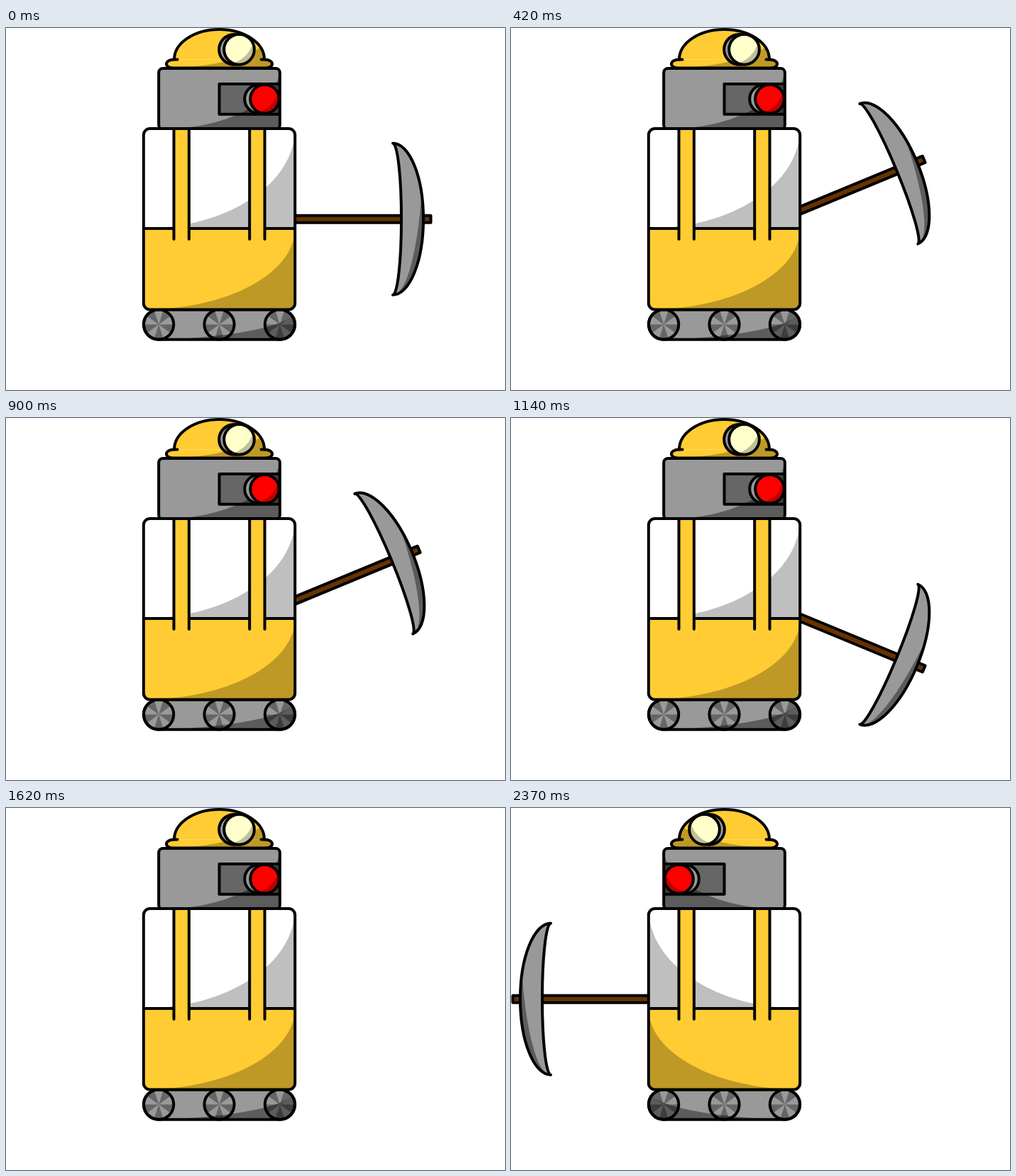
Recreate the animation shown at these times as an HTML page with a canvas. Size 703 by 511 pixels, loop 2.4 s.

```html
<!DOCTYPE html>
<html lang="en">
<head>
<meta charset="utf-8">
<title>Mining robot</title>
<style>
  html, body { margin: 0; width: 100%; height: 100%; overflow: hidden; background: #fff; }
  canvas { display: block; }
</style>
</head>
<body>
<canvas id="stage" width="703" height="511"></canvas>
<script>
const ctx = document.getElementById('stage').getContext('2d');
const LOOP = 2400, TICK = 30;
const U = 64 / 3;                 // design grid unit
const CENTER = 300.5;             // everything is drawn relative to this axis
const HALF = 5 * U, WIDTH = 10 * U;
const BODY_TOP = 142, BELT = 283, BODY_BOTTOM = 397.5;
const YELLOW = '#ffcc33', GRAY = '#999', DARK = '#666';

const clamp = (v, lo, hi) => Math.min(hi, Math.max(lo, v));

function roundBox(x, y, w, h, rx, ry = rx) {
  const p = new Path2D();
  p.roundRect(x, y, w, h, { x: rx, y: ry });
  return p;
}

function oval(x, y, rx, ry = rx) {
  const p = new Path2D();
  p.ellipse(x, y, rx, ry, 0, 0, 7);
  return p;
}

function line(x1, y1, x2, y2) {
  ctx.beginPath();
  ctx.moveTo(x1, y1);
  ctx.lineTo(x2, y2);
  ctx.stroke();
}

function clipped(path, draw) {
  ctx.save();
  ctx.clip(path);
  draw();
  ctx.restore();
}

// Darkens the lower corner of a box outside a quarter ellipse.
function shade(x, y, w, h, dir, alpha) {
  ctx.beginPath();
  if (dir > 0) ctx.ellipse(x, y, w, h, 0, 0, Math.PI / 2);
  else ctx.ellipse(x + w, y, w, h, 0, Math.PI, Math.PI / 2, true);
  ctx.lineTo(dir > 0 ? x + w : x, y + h);
  ctx.closePath();
  ctx.fillStyle = `rgba(0,0,0,${alpha})`;
  ctx.fill();
}

function shape(path, fill, box, dir, alpha) {
  ctx.fillStyle = fill;
  ctx.fill(path);
  if (box) clipped(path, () => shade(...box, dir, alpha));
  ctx.stroke(path);
}

// turn: 0 = facing right, 1 = facing the viewer, 2 = facing left
function faces(turn, drawSide, drawFront) {
  const front = WIDTH * (1 - Math.abs(1 - turn)), side = WIDTH - front;
  const sideX = turn < 1 ? -HALF : HALF - side;
  const frontX = turn < 1 ? HALF - front : -HALF;
  if (front > 0.5) drawFront(frontX, front);
  if (side > 0.5) drawSide(sideX, side);
}

function pickaxe(angle, pull, dir) {
  const pivotX = 77.5, y = 269.7;
  ctx.save();
  ctx.scale(dir, 1);
  ctx.translate(pivotX - pull, y);
  ctx.rotate(angle * Math.PI / 180);
  ctx.translate(-pivotX, 0);
  shape(roundBox(pivotX, -5, 298 - pivotX, 10, 0.5), '#663300');
  const head = new Path2D(), tip = 244.5, reach = 107;
  head.ellipse(tip, 0, 43, reach, 0, -Math.PI / 2, Math.PI / 2);
  head.ellipse(tip, 0, 12, reach, 0, Math.PI / 2, -Math.PI / 2, true);
  head.closePath();
  shape(head, GRAY, [tip, -reach, 43, 2 * reach], 1, 0.4);
  ctx.restore();
}

function wheel(x, y, rx, ry) {
  ctx.fillStyle = DARK;
  ctx.fill(oval(x, y, rx, ry));
  ctx.fillStyle = GRAY;
  const step = Math.PI / 5;
  for (let i = 0; i < 5; i++) {
    const mid = -Math.PI / 2 + i * 2 * step;
    ctx.beginPath();
    ctx.moveTo(x, y);
    ctx.ellipse(x, y, rx, ry, 0, mid - step / 2, mid + step / 2);
    ctx.fill();
  }
  ctx.stroke(oval(x, y, rx, ry));
}

function tracks(turn, dir) {
  const top = BODY_BOTTOM, h = 2 * U - 0.5, r = h / 2;
  const side = (x, w) => {
    const s = w / WIDTH, belt = roundBox(x, top, w, h, r * s, r);
    ctx.fillStyle = GRAY;
    ctx.fill(belt);
    for (const pos of [1, 5, 9]) wheel(x + pos * U * s, top + r, r * s, r);
    clipped(belt, () => shade(x, top, w, h, dir, 0.4));
    ctx.stroke(belt);
  };
  const front = (x, w) => {
    const s = w / WIDTH, fw = 4 * U * s;
    for (const pos of [0.5, 5.5]) {
      const fx = x + pos * U * s;
      shape(roundBox(fx, top, fw, h, 5 * s, 5), DARK, [fx, top, fw, h], dir, 0.6);
    }
  };
  faces(turn, side, front);
}

function bodyFace(x, w, dir, detail) {
  const s = w / WIDTH;
  const face = roundBox(x, BODY_TOP, w, BODY_BOTTOM - BODY_TOP, 9 * s, 9);
  ctx.fillStyle = '#fff';
  ctx.fill(face);
  clipped(face, () => {
    ctx.fillStyle = YELLOW;
    ctx.fillRect(x, BELT, w, BODY_BOTTOM - BELT);
    shade(x, BODY_TOP, w, BELT - BODY_TOP, dir, 0.25);
    shade(x, BELT, w, BODY_BOTTOM - BELT, dir, 0.25);
  });
  line(x, BELT, x + w, BELT);
  detail(x, s);
  ctx.stroke(face);
}

function straps(x, s) {
  const end = 298;
  for (const pos of [2, 7]) {
    const left = x + pos * U * s, w = U * s;
    ctx.fillStyle = YELLOW;
    ctx.fillRect(left, BODY_TOP, w, end - BODY_TOP);
    line(left, BODY_TOP, left, end);
    line(left + w, BODY_TOP, left + w, end);
  }
}

function hatch(x, s) {
  const left = x + 2.5 * U * s, w = 5 * U * s;
  ctx.strokeRect(left, 163.3, w, 213);
  line(left, 269.7, left + w, 269.7);
}

function body(turn, dir) {
  faces(turn,
    (x, w) => bodyFace(x, w, dir, straps),
    (x, w) => bodyFace(x, w, dir, hatch));
}

function lens(x, y, r, rimShift, color, dir) {
  shape(oval(x + rimShift, y, r), GRAY);
  shape(oval(x, y, r), color, [x - r, y - r, 2 * r, 2 * r], dir, 0.25);
}

function head(turn, dir) {
  const top = 57, h = 86, half = 4 * U, eyeY = 100.3;
  const box = roundBox(-half, top, 2 * half, h, 6);
  ctx.fillStyle = GRAY;
  ctx.fill(box);
  clipped(box, () => {
    const left = turn < 1 ? -3 * U * turn : -(2 + turn) * U;
    const right = turn < 1 ? (4 - turn) * U : 3 * U * (2 - turn);
    ctx.fillStyle = DARK;
    ctx.fillRect(left, eyeY - U, right - left, 2 * U);
    shade(-half, top, 2 * half, h, dir, 0.4);
    ctx.strokeRect(left, eyeY - U, right - left, 2 * U);
    // The two eyes mirror each other around the frontal pose.
    for (const [sign, t] of [[1, turn], [-1, 2 - turn]]) {
      const x = sign * (3 - 5 * t) * U;
      lens(x, eyeY, 20.3, sign * clamp(16 * t - 8, -8, 8), '#f00', dir);
    }
  });
  ctx.stroke(box);
}

function helmet(turn, dir) {
  const p = new Path2D('M-59 44.5 H-64 C-77 44.5 -79 56.5 -64 56.5 H64 C79 56.5 77 44.5 64 44.5 H59');
  const dome = new Path2D();
  dome.ellipse(0, 44.5, 63.5, 42.5, 0, Math.PI, 2 * Math.PI);
  const whole = new Path2D();
  whole.addPath(p);
  whole.addPath(dome);
  ctx.fillStyle = YELLOW;
  ctx.fill(p);
  ctx.fill(dome);
  clipped(whole, () => shade(-75, 2, 150, 54.5, dir, 0.25));
  ctx.stroke(p);
  ctx.stroke(dome);
  const side = 1 - turn;
  lens(28 * side, 30.3, U, -7 * side, '#ffffcc', dir);
}

function drawPickaxe(n) {
  const slide = 32;
  if (n <= 48) {
    const p = n % 16;
    pickaxe(11.25 * (p < 4 ? p : p < 12 ? 8 - p : p - 16), 0, 1);
  } else if (n < 54) {
    pickaxe(0, slide * (n - 48), 1);
  } else if (n >= 74) {
    pickaxe(0, slide * (79 - n), -1);
  }
}

function draw(t) {
  const n = Math.floor(t / TICK);
  const step = t < 1710 ? 0 : Math.min(9, Math.floor((t - 1710) / 60) + 1);
  const bodyTurn = clamp(step / 4, 0, 2);
  const headTurn = clamp((step - 1) / 4, 0, 2);   // head and tracks trail by one step
  const dir = step < 4 ? 1 : -1;

  ctx.setTransform(1, 0, 0, 1, 0, 0);
  ctx.fillStyle = '#fff';
  ctx.fillRect(0, 0, 703, 511);
  ctx.translate(CENTER, 0);
  ctx.strokeStyle = '#000';
  ctx.lineWidth = 4;
  ctx.lineCap = ctx.lineJoin = 'round';

  drawPickaxe(n);
  tracks(headTurn, dir);
  head(headTurn, dir);
  helmet(headTurn, dir);
  body(bodyTurn, dir);
}

const start = performance.now();
function tick() {
  draw((performance.now() - start) % LOOP);
  requestAnimationFrame(tick);
}
tick();
</script>
</body>
</html>
```
